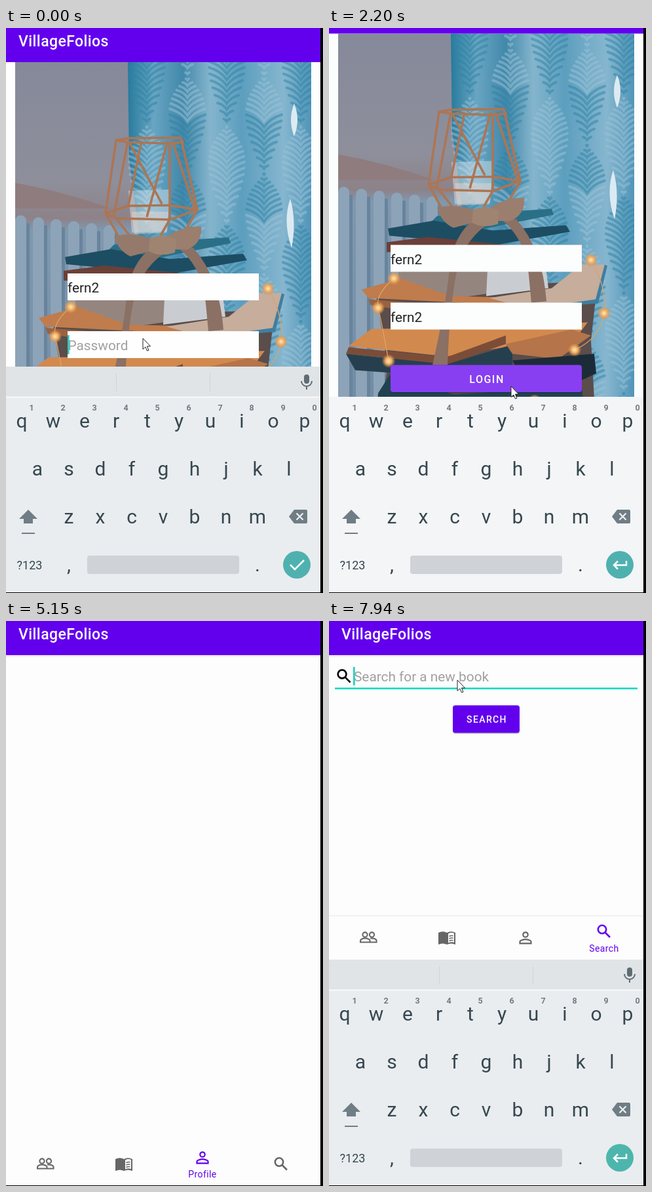
An HTML page that plays this animation: 484x861 px, repeating every 8000 ms.

```html
<!DOCTYPE html>
<html lang="en">
<head>
<meta charset="utf-8">
<title>Book app demo</title>
<style>
html, body { margin: 0; width: 100%; height: 100%; overflow: hidden; background: #fff; }
svg { display: block; }
text { font-family: Roboto, "Open Sans", sans-serif; }
.mid { text-anchor: middle; }
.btn { fill: #fff; font-weight: 500; text-anchor: middle; }
.title { fill: #fff; font-size: 23px; font-weight: 500; letter-spacing: .4px; }
.field { font-size: 20.8px; fill: #212121; }
.hint { font-size: 20.8px; fill: #a0a0a0; }
.tab { font-size: 14px; letter-spacing: .4px; text-anchor: middle; }
</style>
</head>
<body>
<svg id="stage" width="484" height="861" viewBox="0 0 484 861">
  <defs>
    <linearGradient id="wall" x2="0" y2="1">
      <stop offset="0" stop-color="#85899a"/><stop offset=".3" stop-color="#8e8f9b"/>
      <stop offset=".39" stop-color="#8d8288"/><stop offset=".42" stop-color="#8098ae"/>
      <stop offset="1" stop-color="#6d8ba5"/>
    </linearGradient>
    <linearGradient id="cloth">
      <stop offset="0" stop-color="#277a9d"/><stop offset=".14" stop-color="#68a5c2"/>
      <stop offset=".3" stop-color="#4288aa"/><stop offset=".45" stop-color="#85b5cd"/>
      <stop offset=".62" stop-color="#5c9ebe"/><stop offset=".85" stop-color="#86b6cf"/>
      <stop offset="1" stop-color="#5095b8"/>
    </linearGradient>
    <radialGradient id="glow">
      <stop offset="0" stop-color="#ffe9b8"/><stop offset=".5" stop-color="#efac62"/>
      <stop offset="1" stop-color="#d98b45" stop-opacity=".15"/>
    </radialGradient>
    <clipPath id="photoClip"><path d="M14 52h452v610H14z"/></clipPath>
    <clipPath id="loginClip"><rect x="94" y="557" width="292" height="41.5" rx="4"/></clipPath>
    <clipPath id="navClip"><path d="M0 795h480v66H0z"/></clipPath>
  </defs>

  <g id="login">
    <rect id="page" width="480" height="861"/>
    <g id="scroll">
      <g clip-path="url(#photoClip)">
        <path d="M14 52h452v610H14z" fill="url(#wall)"/>
        <path d="M14 236Q90 250 160 275H14z" fill="#8f7c7f"/>
        <g id="radiator"></g>
        <path d="M186 52H466V662H230L205 330 188 200z" fill="url(#cloth)"/>
        <g id="leaves" fill="none" stroke-width="4" stroke-linecap="round"></g>
        <path d="M440 115q10 25 0 50q-10-25 0-50zM434 260q10 35 2 75q-14-40-2-75z" fill="#dcebf2"/>
        <g id="books"></g>
        <path d="M187 248L251 246 246 310 192 312z" fill="#dce6ee" opacity=".45"/>
        <path d="M192 280H248L245 312 196 314z" fill="#e6d8d0" opacity=".5"/>
        <path d="M168 171L188 168 266 167 270 174 250 176 186 174zM168 171L152 282 172 318M186 172L164 290M188 174L238 268M207 172L187 270M247 172L215 288M250 176L250 292M254 172L289 278M268 172L292 277 272 312M152 282L187 271 250 270 292 277 250 292 168 290zM168 290L190 318M250 292L236 316" fill="none" stroke="#ad7554" stroke-width="3.6" stroke-linejoin="round"/>
        <g fill="#8b7064">
          <path d="M222 335Q190 358 184 410 178 470 158 557L181 557Q184 470 194 420 202 372 240 344z"/>
          <path d="M256 330Q300 360 305 420L309 462 332 460Q326 380 286 335z"/>
          <path d="M236 326Q195 308 165 318 172 340 190 348L232 337z" fill="#957a6c"/>
          <path d="M238 323Q270 299 298 303 300 328 276 338L242 337z" fill="#9b7e6e"/>
          <path d="M220 320Q240 312 260 322L258 342Q235 350 218 340z" fill="#a08472"/>
        </g>
        <path d="M99 425Q70 450 75 470T91 551M400 397Q425 440 420 478T375 534M314 612Q280 618 262 636" fill="none" stroke="#d9a566" stroke-width="1.3"/>
        <g id="lights" fill="url(#glow)"></g>
      </g>
      <path d="M0-60H480V52H0z" fill="#6200ee"/>
      <text class="title" x="19" y="28">VillageFolios</text>
      <path class="paper" d="M94 374h292v41H94zM94 462h292v41H94z"/>
      <text class="field" x="94" y="403">fern2</text>
      <text class="hint" id="hint" x="94.5" y="491">Password</text>
      <text class="field" id="pass" x="94" y="491"></text>
      <rect id="caret" y="468" width="2.6" height="29" fill="#1fcfbd"/>
      <rect x="94" y="558.5" width="292" height="41.5" rx="4" opacity=".25"/>
      <rect id="loginBtn" x="94" y="557" width="292" height="41.5" rx="4"/>
      <g id="press" clip-path="url(#loginClip)" fill="#fff">
        <circle cx="240" cy="583" opacity=".13"/><circle cx="257" cy="583" opacity=".26"/>
      </g>
      <text class="btn" x="241" y="584" font-size="16" letter-spacing="1.5">LOGIN</text>
      <rect x="94" y="636" width="292" height="41.5" rx="4" fill="#6200ee"/>
      <text class="btn" x="241" y="663" font-size="16" letter-spacing="1.5">CREATE ACCOUNT</text>
    </g>
  </g>

  <g id="home">
    <path d="M0 0H480V861H0z" fill="#fdfdfd"/>
    <path d="M0 52H480V55H0z" opacity=".06"/>
    <path d="M0 0H480V52H0z" fill="#6200ee"/>
    <text class="title" x="19" y="28">VillageFolios</text>
    <g id="search">
      <g fill="none" stroke="#000" stroke-width="2.6"><circle cx="20" cy="81" r="6.4"/><path d="M24.6 85.6L32.5 93.5"/></g>
      <text class="hint" x="38" y="92">Search for a new book</text>
      <rect id="line" x="9"  width="462"/>
      <rect id="searchCaret" x="37" y="70" width="2.6" height="28" fill="#1fcfbd"/>
      <rect x="189" y="130" width="102" height="42" rx="4" opacity=".2"/>
      <rect x="189" y="128.5" width="102" height="42" rx="4" fill="#6200ee"/>
      <text class="btn" x="241" y="155" font-size="14" letter-spacing="1.4">SEARCH</text>
    </g>
    <g id="nav">
      <path d="M0 795H480V861H0z" fill="#fdfdfd"/>
      <path id="navEdge" d="M0 793.5H480V795H0z" opacity=".06"/>
      <circle id="ripple" cx="417" cy="828" fill="#d6d6d6" clip-path="url(#navClip)"/>
      <g fill="none" stroke="#666" stroke-width="2.1">
        <circle cx="55" cy="823" r="3.6"/><circle cx="65.5" cy="823" r="3.6"/>
        <path d="M48 834.5v-2.5c0-2 4-3.6 7-3.6s7.500 1.600 7.500 3.600v2.500zM63 828.500c4-.6 9.500 1 9.500 3.500v2.500H62"/>
      </g>
      <path d="M167 820q7-3.500 13 0 6-3.500 13 0V838q-7-3-13 0-6-3-13 0z" fill="#666"/>
      <path d="M182 821.500q4.500-2.500 9-.5V835q-4.500-1.500-9 .5z" fill="#fdfdfd"/>
      <path d="M183.500 825.500q3-1.500 6-.8M183.500 829q3-1.500 6-.8M183.500 832.500q3-1.500 6-.8" fill="none" stroke="#666" stroke-width="1.5"/>
      <g id="person" fill="none" stroke-width="2.2"><circle cx="300" cy="813" r="3.700"/><path d="M291.500 826.300v-2.500c0-2 5.300-3.600 8.500-3.600s8.500 1.600 8.500 3.600v2.500z"/></g>
      <text class="tab" id="profileLabel" x="300" y="848">Profile</text>
      <g id="lens" fill="none" stroke-width="2.6"><circle cx="417" cy="824.500" r="6.200"/><path d="M421.500 829L429 836.500"/></g>
      <text class="tab" id="searchLabel" x="420" y="849" fill="#6200ee">Search</text>
    </g>
  </g>

  <g id="keyboard">
    <rect id="keyBg" y="562" width="480" height="299"/>
    <g id="bar">
      <path d="M0 516H480V562H0z" fill="#e0e4e7"/>
      <path d="M0 561.500H480V563.500H0z" fill="#f8fafa"/>
      <path d="M168.500 526v28M311.500 526v28" stroke="#cfd5d8"/>
      <rect x="455" y="528" width="8" height="14" rx="4" fill="#606c73"/>
      <path d="M451 538a8 8 0 0016 0M459 546v5" fill="none" stroke="#606c73" stroke-width="2"/>
    </g>
    <g id="keys" fill="#37474f"></g>
    <path d="M34 734L48 748H41V755H27V748H20z" fill="#707d84"/>
    <path d="M24 770H44" stroke="#707d84" stroke-width="2"/>
    <path d="M440 734H458q2 0 2 2v17q0 2-2 2H440L432 744.500z" fill="#707d84"/>
    <path d="M443.500 739.500l10 10m0-10l-10 10" stroke="#eef1f3" stroke-width="2.200"/>
    <rect x="124" y="804" width="232" height="28" rx="4" fill="#cfd3d7"/>
    <circle id="action" cx="444" cy="818" r="21"/>
    <path id="actionIcon" fill="none" stroke="#fff" stroke-width="2.500"/>
  </g>
  <path id="mouse" d="M0 0V16.500L3.800 13 6.500 19 9 18 6.400 12H11.500z" fill="#fff" stroke="#222" stroke-width="1"/>
  <path d="M480 0H484V861H0V860H480z" fill="#000"/>
</svg>
<script>
const $ = id => document.getElementById(id);
const set = (el, attrs) => { for (const k in attrs) el.setAttribute(k, attrs[k]); };
const show = (id, on) => set($(id), { visibility: on ? "inherit" : "hidden" });
function add(parent, tag, attrs, text) {
  const el = document.createElementNS("http://www.w3.org/2000/svg", tag);
  set(el, attrs);
  if (text) el.textContent = text;
  $(parent).append(el);
}

// Photo parts
for (let x = 14; x < 170; x += 27) {
  add("radiator", "rect", { x, y: 284 + x / 9, width: 17, height: 400, rx: 8, fill: "#8da3b8" });
  add("radiator", "rect", { x: x + 17, y: 296 + x / 9, width: 5, height: 400, fill: "#68849d" });
}
[215, 277, 337, 394, 450].forEach((x, col) => {
  for (let y = 52; y < 662; y += 9) {
    const w = 27 * Math.abs(Math.sin(Math.PI * (y + col * 75) / 150));
    add("leaves", "path", {
      d: `M${x - w} ${y - w * .7}Q${x - w / 3} ${y - w / 2} ${x} ${y}Q${x + w / 3} ${y - w / 2} ${x + w} ${y - w * .7}`,
      stroke: ["#2f83a6", "#9bc4d8"][(col + Math.floor(y / 150)) % 2], opacity: .5
    });
  }
});
[
  ["#5a4d4b", "70,440 410,430 400,520 408,662 70,662 90,560"],
  ["#2b6f86", "150,345 165,330 340,319 343,328 225,352"],
  ["#1d4d63", "90,349 160,337 250,352 362,344 368,354 250,375 92,360"],
  ["#6b4038", "88,370 150,362 290,376 290,385 88,385"],
  ["#95857f", "106,415 290,410 300,440 175,458 106,446"],
  ["#c9cdd2", "242,412 330,400 335,440 240,452"],
  ["#c07c4c", "50,442 110,425 185,452 300,455 300,467 60,455"],
  ["#c6ad9c", "245,455 340,440 385,404 423,404 408,461 300,470"],
  ["#3f7ea1", "421,404 425,406 411,463 300,472 407,457"],
  ["#9c613f", "60,457 180,466 300,468 300,480 180,484 64,466"],
  ["#d2894e", "30,528 65,502 230,500 395,492 380,512 180,544"],
  ["#7b4d38", "30,530 180,545 270,512 270,525 180,556 26,540"],
  ["#263f4e", "26,540 180,556 280,526 280,560 180,575 40,565"],
  ["#b57449", "270,525 370,503 400,512 350,548 280,540"],
  ["#1c2b38", "280,550 405,540 408,570 386,580 290,570"],
  ["#1f4351", "75,600 94,570 190,602 386,590 390,630 190,662 70,662"],
  ["#2d5c73", "190,640 300,622 400,632 385,662 190,662"],
  ["#b1819c", "386,645 455,616 460,632 400,662"],
  ["#2d7289", "14,628 80,662 14,662"]
].forEach(([fill, points]) => add("books", "polygon", { fill, points }));
[[99, 425], [75, 470], [400, 397], [420, 478], [91, 551], [375, 534], [314, 612]]
  .forEach(([cx, cy]) => add("lights", "circle", { cx, cy, r: 10 }));

// Keys
const key = (s, x, y, size = 30) => add("keys", "text", { class: "mid", x, y, "font-size": size }, s);
["qwertyuiop", "asdfghjkl", "zxcvbnm"].forEach((row, r) =>
  [...row].forEach((c, i) => key(c, 24 + [0, 24, 72][r] + 48 * i, 609 + 73 * r)));
[..."1234567890"].forEach((c, i) => add("keys", "text",
  { class: "mid", x: 39 + 48 * i, y: 583, "font-size": 12.5, "font-weight": 700, fill: "#717c82" }, c));
key("?123", 36, 825, 18);
key(",", 96, 828);
key(".", 384, 828);

// The picture only changes at these times: [first, last, count]
const steps = [[0, 0, 1], [250, 490, 3], [860, 1580, 7], [1700, 2060, 4], [2200, 2200, 1], [2340, 2780, 5],
  [3000, 3360, 4], [3730, 4330, 6], [4810, 4810, 1], [5150, 5390, 3], [5890, 6690, 8], [6790, 7490, 7], [7610, 7940, 4]]
  .flatMap(([a, b, n]) => Array.from({ length: n }, (_, i) => n > 1 ? a + (b - a) * i / (n - 1) : a));

const route = [[0, 209, 473], [740, 209, 473], [1580, 443, 821], [1700, 443, 821], [1940, 352, 667], [2200, 278, 546],
  [2500, 236, 492], [2780, 259, 540], [3610, 259, 540], [3850, 285, 480], [4210, 442, 835], [4330, 444, 880],
  [5770, 395, 880], [6250, 416, 826], [6370, 416, 826], [6690, 291, 313], [7490, 196, 90], [8000, 196, 90]];

const clamp = v => Math.max(0, Math.min(1, v));
const ramp = (t, a, b) => clamp((t - a) / (b - a));
const ease = v => v * v * (3 - 2 * v);

function mouseAt(t) {
  const i = Math.max(1, route.findIndex(p => p[0] >= t));
  const [a, x, y] = route[i - 1], [b, u, v] = route[i];
  const k = ease(ramp(t, a, b));
  return [x + (u - x) * k, y + (v - y) * k];
}

function drawLogin(t) {
  const pale = t >= 1820 && t < 2200;
  const white = t < 1820 ? "#fefefe" : pale ? "#f0f1f3" : "#fcfdfd";
  const typed = t < 250 ? "" : t < 370 ? "fe" : t < 490 ? "fern" : "fern2";
  set($("page"), { fill: white });
  set(document.querySelector(".paper"), { fill: white });
  set($("scroll"), { transform: `translate(0 ${t < 1820 ? 0 : pale ? -90 : -43.5})` });
  $("pass").textContent = typed;
  show("hint", !typed);
  show("caret", t < 1820 && !(t >= 860 && t < 1340));
  set($("caret"), { x: 94 + (typed ? $("pass").getComputedTextLength() : 0) });
  set($("loginBtn"), { fill: t < 1820 || t >= 3120 ? "#6200ee" : t < 3000 ? "#883ff1" : "#6f14ee" });
  show("press", t >= 3000 && t < 3360);
  set($("press"), { opacity: 1 - ramp(t, 3000, 3360) });
  for (const c of $("press").children) set(c, { r: 92 + (t - 3000) * .5 });
}

function drawHome(t) {
  const onSearch = t >= 6490, typing = t >= 7610;
  const move = ease(ramp(t, 6690, 7030));
  show("search", onSearch);
  show("searchCaret", typing);
  set($("line"), typing ? { y: 101.5, height: 2.6, fill: "#12d8c3" } : { y: 102, height: 1, fill: "#666" });
  set($("nav"), { transform: `translate(0 ${t >= 7730 ? -345 : 0})` });
  show("navEdge", t >= 7730);
  set($("person"), { transform: `translate(0 ${10 * move})`, stroke: onSearch ? "#666" : "#6200ee" });
  set($("profileLabel"), { opacity: 1 - move, fill: onSearch ? "#666" : "#6200ee" });
  set($("lens"), { transform: `translate(0 ${-9.5 * move})`, stroke: onSearch ? "#6200ee" : "#666" });
  set($("searchLabel"), { opacity: move });
  set($("ripple"), { r: 54 * ramp(t, 6250, 6590), opacity: 1 - ramp(t, 6690, 7030) });
}

function drawKeyboard(t) {
  const first = t < 1820, again = t >= 7610;
  show("keyboard", t < 4810 || again);
  show("bar", first || again);
  set($("keyboard"), { transform: `translate(0 ${again ? 345 * (1 - ease(ramp(t, 7560, 7820))) : 0})` });
  set($("keyBg"), { fill: first || again ? "#e9edf0" : t < 2200 ? "#f0f2f4" : "#f3f5f7" });
  set($("action"), { fill: t >= 1700 && first ? "#80cbc4" : again || t >= 4330 ? "#4db6ac" : "#4fb1af" });
  set($("actionIcon"), { d: first ? "M434 818l7 7 14-14" : "M454 812v6.500h-19m6-6l-6 6 6 6" });
}

function draw(now) {
  const time = now % 8000;
  const t = steps.filter(s => s <= time + .01).pop();
  const home = t >= 4810;
  show("login", !home);
  show("home", home);
  home ? drawHome(t) : drawLogin(t);
  drawKeyboard(t);
  const [x, y] = mouseAt(t);
  set($("mouse"), { transform: `translate(${x} ${y})` });
}

const start = performance.now();
function tick() {
  draw(performance.now() - start);
  requestAnimationFrame(tick);
}
tick();
</script>
</body>
</html>
```
